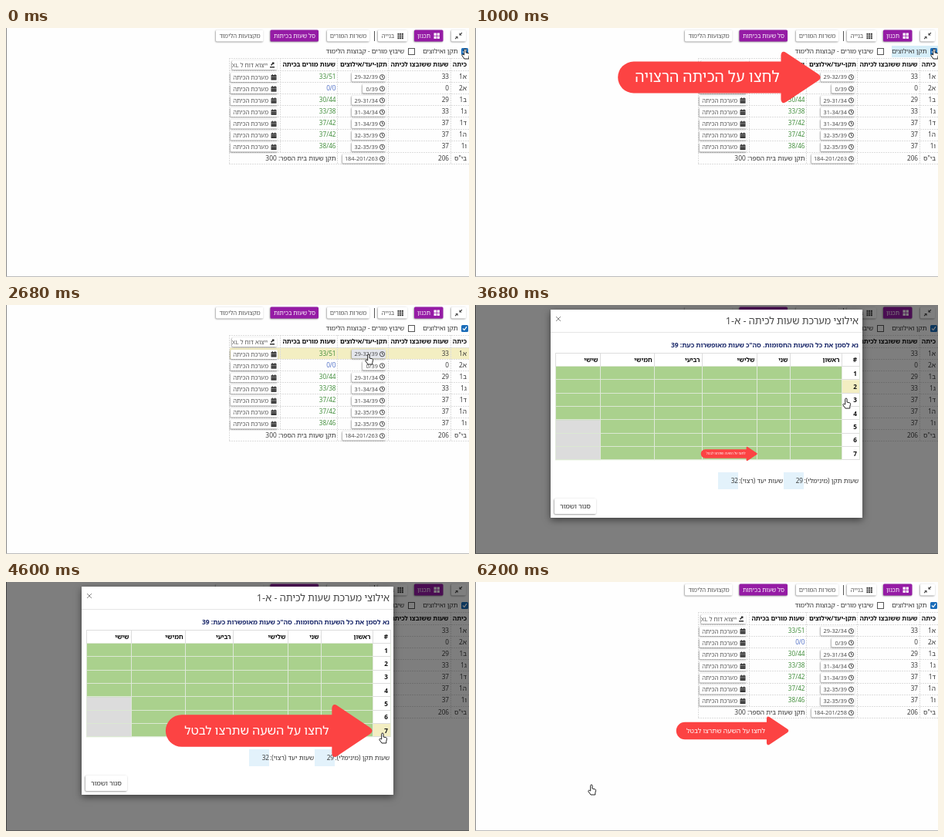
These frames come from a looping animation (600x323 px, 6.24 s). An HTML page with a canvas:

```html
<!DOCTYPE html>
<html lang="he">
<head>
<meta charset="utf-8">
<style>
html, body { margin: 0; width: 100%; height: 100%; overflow: hidden; background: #fff; }
canvas { display: block; }
</style>
</head>
<body>
<canvas id="stage" width="600" height="323"></canvas>
<script>
const ctx = document.getElementById('stage').getContext('2d');
const LOOP = 6240;
const FONT = '"Open Sans", "Noto Sans Hebrew", "Noto Sans", sans-serif';
const PURPLE = '#951ba5', HOVER = '#f3eec2', INK = '#333', SOFT = '#555';

const HAND = new Path2D('M-1.3 8V1.2a1.2 1.2 0 0 1 2.4 0V5l3.4.8a1.5 1.5 0 0 1 1.1 1.6l-.8 3.4V13H-1L-4 8.8a1 1 0 0 1 1.4-1.4Z');
const POINTER = new Path2D('M0 0V9L2 7.2 3.6 10.6 5 10 3.5 6.7H6.3Z');
const CALLOUT = new Path2D('M-96-20.5H96V-29Q97-36 103-32L145-4Q150 0 145 4L103 32Q97 36 96 29V20.5H-96A20.5 20.5 0 0 1-96-20.5Z');
const SHRINK = new Path2D('M1 -4V-.8H4.2ZM-1 4V.8H-4.2ZM2 -2.4L4 -4.4 4.8 -3.6 2.8 -1.6ZM-2 2.4L-4 4.4 -4.8 3.6 -2.8 1.6Z');

// time, x, y of the pointer tip
const PATH = [
  [0, 595, 27], [1600, 595, 27], [2250, 470, 64], [2900, 470, 64], [3220, 471, 71], [3680, 481, 121],
  [3880, 482, 133], [4400, 488, 196], [5140, 488, 196], [5640, 178, 258], [5740, 178, 258],
  [5840, 151, 263], [LOOP, 151, 263]
];

const CLASSES = [
  ['א1', 33, '29-32/39', '33/51'], ['א2', 0, '0/39', '0/0'], ['ב1', 29, '29-31/34', '30/44'],
  ['ג1', 33, '31-34/34', '33/38'], ['ד1', 37, '31-34/39', '37/42'],
  ['ה1', 37, '32-35/39', '37/42'], ['ו1', 37, '32-35/39', '38/46']
];
const DAYS = ['ראשון', 'שני', 'שלישי', 'רביעי', 'חמישי', 'שישי'];
const DAY_EDGES = [475, 408, 365, 294, 232, 162, 104];

const clamp = v => Math.max(0, Math.min(1, v));
const progress = (t, start, length) => clamp((t - start) / length);
const easeOut = u => 1 - (1 - u) ** 3;

function elastic(u) {
  if (u <= 0) return 0;
  return 1 + 2 ** (-10 * u) * Math.sin((u - 0.075) * 2 * Math.PI / 0.3);
}

function pointerAt(t) {
  const i = Math.max(1, PATH.findIndex(p => p[0] >= t));
  const [a, b] = [PATH[i - 1], PATH[i]];
  const u = progress(t, a[0], b[0] - a[0]);
  return { x: a[1] + (b[1] - a[1]) * u, y: a[2] + (b[2] - a[2]) * u };
}

function rect(x, y, w, h, color) {
  ctx.fillStyle = color;
  ctx.fillRect(x, y, w, h);
}

function line(x1, y1, x2, y2, color, width = 1) {
  ctx.strokeStyle = color;
  ctx.lineWidth = width;
  ctx.beginPath();
  ctx.moveTo(x1, y1);
  ctx.lineTo(x2, y2);
  ctx.stroke();
}

// y is the middle of the letters
function text(str, x, y, size = 8.4, color = INK, weight = 400, align = 'right') {
  ctx.font = `${weight} ${size}px ${FONT}`;
  ctx.direction = 'rtl';
  ctx.textAlign = align;
  ctx.fillStyle = color;
  ctx.fillText(str, x, y + size * 0.33);
}

const heading = (str, x, y) => text(str, x, y, 8.2, '#111', 700);

function button(x1, y1, x2, y2, color = '#fff') {
  ctx.save();
  ctx.shadowColor = 'rgba(0,0,0,.45)';
  ctx.shadowBlur = 2;
  ctx.shadowOffsetX = -0.6;
  ctx.shadowOffsetY = 0.8;
  ctx.fillStyle = color;
  ctx.beginPath();
  ctx.roundRect(x1, y1, x2 - x1, y2 - y1, 1.5);
  ctx.fill();
  ctx.restore();
}

function dots(x, y, n, size, step, color) {
  for (let i = 0; i < n * n; i++) rect(x + i % n * step, y + Math.floor(i / n) * step, size, size, color);
}

function clock(x, y) {
  ctx.strokeStyle = INK;
  ctx.lineWidth = 0.9;
  ctx.beginPath();
  ctx.arc(x, y, 3.1, 0, 7);
  ctx.moveTo(x, y - 2);
  ctx.lineTo(x, y);
  ctx.lineTo(x + 1.5, y + 0.6);
  ctx.stroke();
}

function calendar(x, y) {
  rect(x - 3.5, y - 3, 7, 6.5, INK);
  line(x - 3.5, y - 0.8, x + 3.5, y - 0.8, '#ccc', 0.6);
  line(x - 3.5, y + 1.2, x + 3.5, y + 1.2, '#888', 0.5);
  rect(x - 2.2, y - 4, 1, 1.5, INK);
  rect(x + 1.2, y - 4, 1, 1.5, INK);
}

function tool(x1, x2, label, textX, active) {
  button(x1, 2.5, x2, 17.5, active ? PURPLE : '#fff');
  text(label, textX, 10, 7.7, active ? '#fff' : SOFT, 400, 'center');
}

function toolbar(t) {
  button(577, 2.5, 596, 17.5);
  ctx.save();
  ctx.translate(586.5, 10.2);
  ctx.fillStyle = INK;
  ctx.fill(SHRINK);
  ctx.restore();
  tool(529, 566.5, 'תכנון', 541.5, true);
  dots(554.5, 6.5, 2, 3.3, 4.1, '#fff');
  tool(482, 520, 'בנייה', 495, false);
  dots(507.5, 6.8, 3, 2, 2.7, INK);
  line(477.5, 4, 477.5, 17, '#555');
  tool(416, 471, 'משרות המורים', 443.5, false);
  tool(342.5, 405, 'סל שעות בכיתות', 374, true);
  tool(272, 333.5, 'מקצועות הלימוד', 303, false);

  if (t > 60 && t < 1680) rect(540, 23, 60, 15, '#d5edf8');
  ctx.fillStyle = '#1a6cb8';
  ctx.beginPath();
  ctx.roundRect(590, 26, 9, 9, 1.5);
  ctx.fill();
  line(592, 30.5, 593.8, 32.6, '#fff', 1.2);
  line(593.8, 32.6, 597, 28.2, '#fff', 1.2);
  text('תקן ואילוצים', 585.5, 30.5);
  ctx.strokeStyle = '#555';
  ctx.lineWidth = 1;
  ctx.strokeRect(521.5, 26.5, 8, 8);
  text('שיבוץ מורים - קבוצות הלימוד', 516, 30.5);
}

function classTable(t, pointer, saved) {
  const rowY = i => 56 + 15.1 * i;
  const isOver = i => t > 1900 && pointer.x > 290 && pointer.y >= rowY(i) - 1 && pointer.y < rowY(i + 1) - 1;
  for (let i = 0; i < 7; i++) {
    if (isOver(i)) rect(290, rowY(i) - 1, 310, 15.1, HOVER);
  }
  ctx.setLineDash([2, 1]);
  for (let i = -1; i < 9; i++) {
    const y = i < 0 ? 39.5 : Math.round(rowY(i)) - 0.5;
    line(289, y, 600, y, '#ddd');
  }
  for (const x of [289.5, 355.5, 429.5, 495.5, 576.5]) {
    line(x, 39, x, x === 355.5 ? 162 : 177, '#ddd');
  }
  ctx.setLineDash([]);

  heading('כיתה', 597, 47.5);
  heading('שעות ששובצו לכיתה', 573.5, 47.5);
  heading('תקן-יעד/אילוצים', 494, 47.5);
  heading('שעות מורים בכיתה', 427, 47.5);
  button(293, 42, 351, 54);
  text('ייצוא דוח ל XL', 339, 48, 7.7, SOFT);
  rect(342, 50, 6, 1.5, INK);
  line(343.5, 48.5, 346.5, 45, INK, 1.5);
  rect(345, 44.5, 2.5, 2.5, INK);

  const limitButton = (label, y, over) => {
    const left = 482 - (label.length > 9 ? 43 : label.length > 5 ? 31 : 17);
    button(left - 3, y - 6, 492, y + 6, over ? '#e4e6ec' : '#fff');
    text(label, 482, y + 0.5, 7.4, '#444');
    clock(487.5, y + 0.2);
  };
  CLASSES.forEach(([name, hours, limit, teachers], i) => {
    const y = rowY(i) + 7;
    const over = isOver(i) && pointer.x > 448 && pointer.x < 492;
    text(name, 597, y);
    text(String(hours), 574, y, 8.2);
    limitButton(i === 0 && saved ? '29-32/34' : limit, y + 0.5, over);
    text(teachers, 427.5, y, 8.2, i === 1 ? '#4a6bc5' : '#3b8a35');
    button(291, y - 5, 352, y + 7);
    text('מערכת הכיתה', 340, y + 1, 7.7, SOFT);
    calendar(347, y + 1);
  });
  const y = rowY(7) + 7.5;
  text('בי"ס', 597, y);
  text('206', 574, y, 8.2);
  limitButton(saved ? '184-201/258' : '184-201/263', y + 0.3, false);
  text('תקן שעות בית הספר: 300', 427.5, y);
}

function dialog(t, open) {
  ctx.save();
  ctx.globalAlpha = open;
  rect(0, 0, 600, 323, 'rgba(0,0,0,.5)');
  ctx.translate(0, -30 * (1 - open));
  ctx.save();
  ctx.shadowColor = 'rgba(0,0,0,.5)';
  ctx.shadowBlur = 9;
  ctx.shadowOffsetY = 3;
  rect(98, 6, 404, 270, '#fff');
  ctx.restore();

  text('אילוצי מערכת שעות לכיתה - א-1', 497, 21, 12.7, '#444');
  line(105, 15, 111, 21, '#888');
  line(111, 15, 105, 21, '#888');
  line(98, 35.5, 502, 35.5, '#e5e5e5');
  const blocked = t > 4800;
  text(`נא לסמן את כל השעות החסומות. סה"כ שעות מאופשרות כעת: ${blocked ? 34 : 39}`, 497, 52, 8.45, '#1c2a6b', 700);

  const top = 80, step = 17.3, bottom = top + 7 * step;
  rect(104, top, 371, 7 * step, '#aad18d');
  rect(104, top + 4 * step, 58, 3 * step, '#dcdcdc');
  if (blocked) rect(162, top + 6 * step, 313, step, '#fcc010');
  const hover = pointerAt(t - 80);
  const row = hover.x > 475 ? Math.floor((hover.y - top) / step) : -1;
  if (row >= 0 && row < 7) rect(476, top + row * step, 22, step, HOVER);

  for (let i = 0; i < 8; i++) {
    const y = Math.round(top + i * step) - 0.5;
    line(104, y, 475, y, '#dbe8d2');
    line(475, y, 498, y, '#ddd');
    if (i < 7) heading(String(i + 1), 495, top + (i + 0.52) * step);
  }
  line(104, 62.5, 498, 62.5, '#ddd');
  for (const x of [498, ...DAY_EDGES]) {
    line(x + 0.5, 62, x + 0.5, top, '#ddd');
    line(x + 0.5, top, x + 0.5, bottom, '#e0e8da');
  }
  heading('#', 495, 71);
  DAYS.forEach((day, i) => heading(day, DAY_EDGES[i] - 2.5, 71));

  text('שעות תקן (מינימלי):', 497, 228);
  rect(400, 217, 26, 22, '#e3f2fb');
  text('29', 425, 228, 8.2);
  text('שעות יעד (רצוי):', 399, 228);
  rect(315, 217, 26, 22, '#e3f2fb');
  text('32', 341, 228, 8.2);
  button(103, 251, 157, 271);
  text('סגור ושמור', 130, 261, 8.7, INK, 400, 'center');
  ctx.restore();
}

function drawPointer(t, { x, y }) {
  const isHand = t < 1640 || (t > 2150 && t < 5180) || t > 5790;
  const shape = isHand ? HAND : POINTER;
  ctx.save();
  ctx.translate(x, y);
  ctx.fillStyle = '#fff';
  ctx.strokeStyle = '#222';
  ctx.lineWidth = 1;
  ctx.fill(shape);
  ctx.stroke(shape);
  ctx.restore();
}

function callout(t, label, size, x, y, start, end) {
  const scale = elastic((t - start) / 2560) * (1 - progress(t, end, 300) ** 2);
  if (scale <= 0) return;
  ctx.save();
  ctx.translate(x, y);
  ctx.scale(scale, scale);
  ctx.fillStyle = '#fc4343';
  ctx.fill(CALLOUT);
  text(label, 0, 0, size, '#fff', 300, 'center');
  ctx.restore();
}

function draw(t) {
  const pointer = pointerAt(t);
  const open = easeOut(progress(t, 2720, 320)) * (1 - progress(t, 5900, 240));
  rect(0, 0, 600, 323, '#fefefe');
  toolbar(t);
  classTable(t, open > 0 ? { x: 0, y: 0 } : pointer, t > 5900);
  rect(0, 0, 1, 323, '#888');
  rect(0, 322, 600, 1, '#bbb');
  if (open > 0) dialog(t, open);
  drawPointer(t, pointer);
  callout(t, 'לחצו על הכיתה הרצויה', 19.7, 301, 64, 50, 2250);
  callout(t, 'לחצו על השעה שתרצו לבטל', 15.7, 325, 193, 3616, 6000);
}

const began = performance.now();
function tick() {
  draw((performance.now() - began) % LOOP);
  requestAnimationFrame(tick);
}
tick();
</script>
</body>
</html>
```
